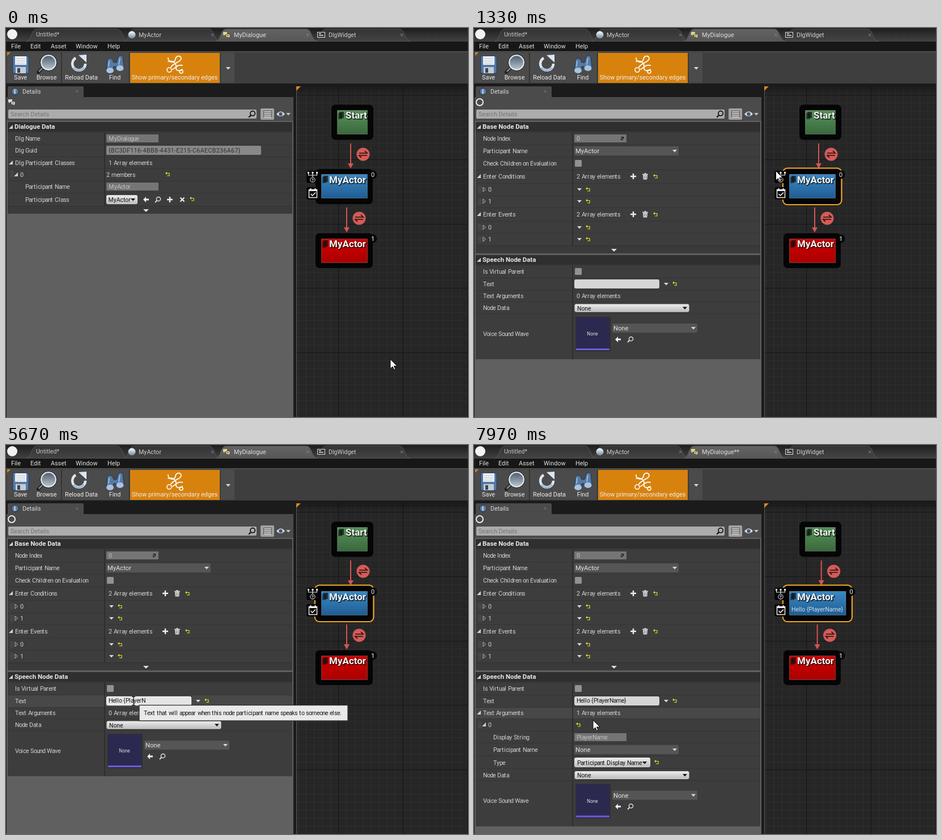
These frames come from a looping animation (815 px wide and 687 px high, 8000 ms). An HTML page:

```html
<!DOCTYPE html>
<html>
<head>
<meta charset="utf-8">
<style>
html,body{margin:0;width:100%;height:100%;overflow:hidden;background:#1c1c1c}
svg{display:block;width:815px;height:687px}
text{font-family:Roboto,sans-serif;white-space:pre}
</style>
</head>
<body>
<svg id="stage" viewBox="0 0 815 687" xmlns="http://www.w3.org/2000/svg"></svg>
<script>
const LOOP = 8000;
const MESSAGE = 'Hello {PlayerName}';
const KEYS = [2830, 2900, 3000, 3100, 3270, 3400, 4270, 4600, 4770, 4870, 5000, 5170, 5230, 5430, 5900, 6000, 6070, 6530];
const PATH = [[0, 678, 585], [430, 678, 585], [820, 621, 281], [1100, 621, 281], [1230, 558, 236], [1270, 558, 236],
  [1630, 225, 452], [7250, 225, 452], [7330, 165, 464], [7450, 100, 470], [7500, 100, 470], [7660, 11, 474],
  [7720, 11, 474], [7970, 210, 486]];
const SELECT = 870, FOCUS = 1770, BLUR = 7450, EXPAND = 7700;
const GROW = 88.5;

// Whole-pixel glyph advances, as in the small hinted UI type
const ADVANCE = {};
[['ilIj .,', 3], ['rtf{}-/', 4], ['PASVETBKLFXYR0123456789', 6], ['CDNHGOU', 7], ['w', 7], ['mW', 9], ['M', 10]]
  .forEach(([set, w]) => [...set].forEach(c => ADVANCE[c] = w));
const step = c => ADVANCE[c] || 5;
const width = s => [...s].reduce((w, c) => w + step(c), 0);
function spots(x, s) {
  return [...s].map(c => { const at = x; x += step(c); return at; }).join(' ');
}

const esc = s => s.replace(/&/g, '&amp;').replace(/</g, '&lt;');
const rect = (x, y, w, h, fill, more = '') => `<rect x="${x}" y="${y}" width="${w}" height="${h}" fill="${fill}" ${more}/>`;
const path = (d, more) => `<path d="${d}" ${more}/>`;
const line = (d, color, w = 1, more = '') => path(d, `fill="none" stroke="${color}" stroke-width="${w}" ${more}`);
const circle = (x, y, r, fill, more = '') => `<circle cx="${x}" cy="${y}" r="${r}" fill="${fill}" ${more}/>`;
const text = (x, y, s, size = 10.8, fill = '#d4d4d4', more = '') =>
  `<text x="${x}" y="${y}" font-size="${size}" fill="${fill}" ${more}>${esc(s)}</text>`;
const small = (x, y, s, fill = '#d2d2d2', more = '') =>
  `<text x="${spots(x, s)}" y="${y}" font-size="10.67" fill="${fill}" ${more}>${esc(s)}</text>`;
const group = (id, body, more = '') => `<g id="${id}" ${more}>${body}</g>`;
const at = (x, y, body) => `<g transform="translate(${x} ${y})">${body}</g>`;
const bold = 'font-weight="700"';

// Small icons
const undo = (x, y) => at(x, y, line('M-3-1.5H3V3H-1', '#dede28', 1.2) + path('M-4-1.5l3-2.5v5z', 'fill="#dede28"'));
const down = (x, y, f = '#d8d8d8') => path(`M${x - 4} ${y - 2}h8l-4 4.5z`, `fill="${f}"`);
const open = (x, y) => path(`M${x + 3} ${y - 4}v7h-7z`, 'fill="#d0d0d0"');
const shut = (x, y) => line(`M${x - 2} ${y - 4}l4.5 4-4.5 4z`, '#b8b8b8');
const plus = (x, y) => line(`M${x - 5} ${y}h10M${x} ${y - 5}v10`, '#eee', 2.4);
const cross = (x, y) => line(`M${x - 3.5} ${y - 3.5}l7 7m0-7l-7 7`, '#eee', 2.2);
const back = (x, y) => path(`M${x - 5} ${y}l5-5v3.5h5v3h-5v3.5z`, 'fill="#eee"');
const lens = (x, y, c = '#ddd', k = 1) => at(x, y, `<g transform="scale(${k})">` +
  circle(1, -1, 3.6, 'none', `stroke="${c}" stroke-width="1.5"`) + line('M-1.5 1.5L-5 5', c, 2) + '</g>');
const bin = (x, y) => at(x, y, path('M-4-2.5h8L3.3 5.5h-6.6z', 'fill="#ddd"') + line('M-5-3.5H5M-1.5-5h3', '#ddd', 1.3) +
  line('M-1.5-1v5M1.5-1v5', '#444', .8));
const grip = (x, y) => line(`M${x} ${y - 5}v11M${x + 3} ${y - 5}v11`, '#727272', 1.2, 'stroke-dasharray="1.3 1.7"');
const box = (x, y) => rect(x, y, 12, 12, '#929292', 'rx="1.5"');
const dim = (y, s) => rect(177, y - 7, 92, 14, '#757575', 'rx="1"') + small(181, y + 4, s, '#c0c0c0');
const combo = (x, y, w, s) => rect(x, y - 8, w, 16, '#555', 'rx="2"') +
  text(x + 2, y + 4, s, 11.2, '#e4e4e4') + down(x + w - 7, y);
const pale = (x, y, w, h) => rect(x, y, w, h, 'url(#pale)', 'rx="2" stroke="#dedede"');
const light = (x, y, w, s) => pale(x, y - 6.5, w, 13) + text(x + 4, y + 4, s, 10.4, '#111') + down(x + w - 7, y, '#111');
const bubbles = (x, y, c) => at(x, y, path('M-6-5h7v5h-4l-2 2v-2h-1z', `fill="${c}"`) +
  path('M-1-1h7v5h-1v2l-3-2h-3z', `fill="${c}" stroke="#444" stroke-width=".7"`) + line('M1 1.5h3', '#444'));

const bar = (y, s) => rect(3, y, 502, 17, '#2f2f2f') + open(9, y + 9) + text(15, y + 12.2, s, 11.4, '#e6e6e6', bold);
const rows = (ys, to) => ys.map(y => line(`M3 ${y + .5}H505`, '#353535')).join('') +
  line(`M174 ${ys[0]}V${to}`, '#292929', 1.4);
const foot = y => rect(3, y, 502, 14, '#3a3a3a') + line(`M3 ${y + .5}H505`, '#303030') + path(`M242 ${y + 6}h10l-5 5z`, 'fill="#ddd"');
const label = (y, s, x = 16) => small(x, y + 4, s);

function tabShape(x, w, fill) {
  return path(`M${x} 24C${x + 10} 22 ${x + 8} 2 ${x + 18} 2H${x + w - 16}C${x + w - 6} 2 ${x + w - 8} 22 ${x + w + 4} 24z`,
    `fill="${fill}" stroke="#666" stroke-width=".7"`);
}

function saveIcon() {
  return path('M12 49h25l3 3v28h-28z', 'fill="#5479a6" stroke="#263a55"') + rect(16, 50, 20, 15, '#eef1f5') +
    line('M18 54h16M18 58h16M18 62h16', '#b7c1cc') + rect(17, 69, 18, 11, '#c6cbd2') + rect(20, 71, 5, 8, '#34475f');
}

function browseIcon() {
  return line('M65 70l-8 8', '#222', 6, 'stroke-linecap="round"') + line('M66 69l-8 8', '#888', 2.5) +
    circle(75, 61, 13, 'url(#glass)', 'stroke="#e4e7ea" stroke-width="2.5"') + circle(75, 61, 14.6, 'none', 'stroke="#222"');
}

function reloadIcon() {
  return line('M123 53A11.500 11.500 0 1 0 140 63', '#dce6f2', 4.5) + path('M128 48l14-1v14z', 'fill="#dce6f2"') +
    line('M119 70A12 12 0 0 0 138 70', '#8eb0d6', 2.5);
}

function findIcon() {
  const eye = (x, y) => `<ellipse cx="${x}" cy="${y}" rx="6.5" ry="5" fill="#a9c3e2"/>`;
  return path('M177 75l2-19q4-5 9 0l2 5h5l3-10q4-5 8 0l2 18q-3 8-11 6l-3-7h-4l-2 9q-7 4-11-2z', 'fill="#547aa6" stroke="#22334a"') +
    eye(183.5, 75) + eye(201, 71) + line('M182 58l-1 10M201 53l-2 12', '#9bbade', 2);
}

function edgesIcon() {
  return line('M286 53c0 9 12 9 13 2s10-7 10-1-13 7-18 15M286 59c10-3 15 5 14 11s8 7 11 3M311 66c-9-2-11 4-17 7', '#fff', 1.8, 'stroke-linecap="round"') +
    circle(288, 74, 4, 'none', 'stroke="#fff" stroke-width="1.6"') + circle(309, 77, 3, 'none', 'stroke="#fff" stroke-width="1.6"');
}

function chrome() {
  const tool = (x, s) => text(x, 91, s, 10.75, '#eee', 'text-anchor="middle"');
  const closer = x => line(`M${x - 2} 10l4.5 4.5m0-4.5l-4.5 4.5`, '#888');
  return rect(0, 0, 815, 24, 'url(#top)') +
    tabShape(36, 176, 'url(#tab)') + tabShape(208, 166, 'url(#tab)') + tabShape(546, 164, 'url(#tab)') + tabShape(370, 176, 'url(#tabOn)') +
    circle(11, 11, 9, '#f2f2f2') +
    text(53, 15, 'Untitled*', 10.6, '#c4c4c4') + text(234, 16, 'MyActor', 10.7, '#cecece') + text(569, 16, 'DlgWidget', 10.6, '#cecece') +
    `<text id="docTab" x="402" y="16" font-size="10.8" fill="#dedede"></text>` +
    circle(222, 12, 6.5, 'url(#ball)') + bubbles(389, 12, '#e0d68c') +
    rect(549.5, 7.5, 13, 9, '#333', 'stroke="#ddd"') + line('M552 10h4M552 13h8', '#ddd', 1.3) +
    closer(364) + closer(532) + closer(698) +
    rect(0, 24, 815, 17, '#171717') +
    [[9, 'File'], [43, 'Edit'], [79, 'Asset'], [123, 'Window'], [179, 'Help']].map(([x, s]) => text(x, 36, s, 10.8, '#e2e2e2')).join('') +
    rect(0, 41, 815, 57, '#3e3e3e') + rect(0, 41, 815, 1.5, '#555') +
    rect(2, 43.5, 95, 53, '#4b4b4b', 'rx="2"') + rect(99, 43.5, 304, 53, '#4b4b4b', 'rx="2"') +
    line('M97.5 44v53M217.5 44v53', '#2b2b2b') + path('M2 43h6l-6 6z', 'fill="#d28a1c"') +
    rect(219, 44, 158, 53, '#d8820e') + line('M378 44v53', '#333') + down(392, 71, '#ddd') +
    tool(25.5, 'Save') + tool(71.5, 'Browse') + tool(133, 'Reload Data') + tool(192, 'Find') + tool(297.5, 'Show primary/secondary edges') +
    saveIcon() + browseIcon() + reloadIcon() + findIcon() + edgesIcon() +
    rect(0, 98, 815, 5, '#1b1b1b');
}

function panelFrame() {
  return rect(0, 102, 512, 585, '#1b1b1b') + rect(1, 122, 506, 565, '#606060') + path('M3 122V105q0-2 2-2h130q2 0 2 2v17z', 'fill="#4b4b4b"') +
    rect(1, 122, 506, 42, '#4b4b4b') +
    circle(16, 112, 6, '#5c7fa8', 'stroke="#20293a"') + text(14.3, 116, 'i', 10, '#fff', bold) +
    text(29, 116, 'Details', 10.6, '#d8d8d8') + line('M123.5 110l4 4m0-4l-4 4', '#7d7d7d') +
    rect(4, 144, 438, 16, '#acacac', 'rx="2"') + text(8, 156, 'Search Details', 10.7, '#757575') + lens(434, 152, '#111', 1.15) +
    rect(449, 142, 24, 20, '#a2a2a2', 'rx="2"') + rect(454, 146, 15, 12, '#555') + line('M455 148h13M455 151h13M455 154h13M455 157h13', '#eee', 1.3) +
    path('M477 152q8-9 15 0-8 8-15 0z', 'fill="#d8dde4"') + circle(484.5, 152, 3.2, '#48566b') + down(498, 152, '#c0c0c0');
}

function dialogueView() {
  return bubbles(10, 131, '#ddd') + bar(166, 'Dialogue Data') + rect(3, 183, 502, 131, '#3d3d3d') + rows([184, 205, 227, 248, 270, 291], 314) + foot(314) +
    label(195, 'Dlg Name') + dim(195, 'MyDialogue') +
    label(216, 'Dlg Guid') + rect(177, 208, 273, 16, '#888', 'rx="2"') +
    text(181, 220, '{BC3DF116-4BB8-4431-E215-C6AECB236A67}', 10.67, '#303030', 'letter-spacing=".36"') +
    open(9, 238) + label(237.5, 'Dlg Participant Classes') + small(181, 241.5, '1 Array elements') +
    grip(9, 258) + open(18, 259) + label(259, '0', 25) + small(177, 263, '2 members') + undo(285, 258) +
    label(280, 'Participant Name', 34) + dim(280, 'MyActor') +
    label(303, 'Participant Class', 34) + pale(177.5, 295.5, 54, 15) +
    text(180.5, 307, 'MyActor', 10.5, '#111') + down(224, 303, '#111') +
    back(247, 303) + lens(268, 303) + plus(289, 303) + cross(311, 303) + undo(328, 302);
}

function arrayRows(y, s) {
  return open(9, y) + label(y, s) + small(181, y + 4, '2 Array elements') + plus(281, y) + bin(302, y) + undo(320, y) +
    [[y + 23, '0'], [y + 44, '1']].map(([r, n]) => grip(9, r) + shut(18, r) + label(r, n, 25) + down(186, r) + undo(201, r)).join('');
}

function nodeView() {
  return circle(10, 131, 6, 'none', 'stroke="#eee" stroke-width="2"') +
    rect(3, 183, 502, 201, '#3d3d3d') + `<rect id="lowBack" x="3" y="418" width="502" fill="#3d3d3d"/>` +
    `<rect id="hover" x="3" width="502" fill="#484848"/>` +
    bar(166, 'Base Node Data') + rows([184, 206, 228, 250, 274, 296, 317, 341, 362], 384) + foot(384) + rect(3, 398, 502, 3, '#606060') +
    label(195, 'Node Index') + dim(195, '0') + path('M259 192h5v5zM259 194v4h4z', 'fill="#222"') +
    label(217, 'Participant Name') + combo(177, 217, 184, 'MyActor') +
    label(239, 'Check Children on Evaluation') + box(178, 233) +
    arrayRows(262, 'Enter Conditions') + arrayRows(329, 'Enter Events') +
    bar(401, 'Speech Node Data') + rows([419, 441, 463, 483], 505) +
    label(430, 'Is Virtual Parent') + box(178, 424) +
    label(452, 'Text') + `<rect id="field" x="177.5" y="444.5" width="149" height="15" rx="2"/>` +
    `<text id="typed" y="455" font-size="10.67" fill="#161616"></text>` + `<rect id="caret" y="445" width="1" height="12" fill="#111"/>` +
    down(339, 452) + undo(354, 451.5) +
    label(473, 'Text Arguments') + `<text id="count" y="477" font-size="10.67" fill="#d2d2d2"></text>` + group('argArrow', open(9, 473)) +
    group('args', rows([483, 505, 526, 549, 571], 590) +
      grip(9, 494) + open(18, 494) + label(494, '0', 25) + undo(184, 494) +
      label(516, 'Display String', 34) + dim(516, 'PlayerName') +
      label(538, 'Participant Name', 34) + combo(177, 538, 184, 'None') +
      label(560.5, 'Type', 34) + pale(177.5, 552.5, 133, 16) +
      small(182, 564.5, 'Participant Display Name', '#111') + down(301, 561, '#111') + undo(322, 560)) +
    group('low', rows([504], 585) + label(494, 'Node Data') + light(178, 494.5, 201, 'None') +
      label(539.5, 'Voice Sound Wave') + rect(179, 510, 62, 61, '#303030') + rect(180, 511, 59, 56, '#2c2950') + rect(180, 566, 59, 3, '#6a5ce2') +
      text(209, 543, 'None', 8.2, '#ddd', 'text-anchor="middle"') + combo(244, 530, 150, 'None') + back(254, 550) + lens(276, 550));
}

function gridLines() {
  let fine = '', strong = '';
  const add = (i, d) => i % 8 ? fine += d : strong += d;
  for (let i = -5; i <= 15; i++) add(i, `M${Math.round(586 + i * 14.25) + .5} 103V687`);
  for (let i = -1; i < 40; i++) add(i, `M512 ${Math.round(118 + i * 14.22) + .5}H815`);
  return line(fine, '#2e2e2e') + line(strong, '#151515');
}

const title = (x, y, s) => text(x + 1, y + 1, s, 17, '#000', bold + ' stroke="#000" stroke-width="1.5" opacity=".65"') + text(x, y, s, 17, '#f4f4f4', bold);
const badge = (x, y, s) => circle(x, y, 7.5, '#080808') + text(x, y + 4, s, 11, '#eee', 'text-anchor="middle"');
const mark = (x, y) => rect(x + 2, y, 8, 11, '#111', 'opacity=".7"') + rect(x, y + 2, 7, 11, '#111', 'opacity=".55"');
const rim = 'stroke="#fff" stroke-opacity=".22"';
const face = (x, y, w, fill) => rect(x + .5, y + .5, w - 1, 42, fill, rim);
function edge(id, x, y) {
  return group(id, line(`M${x} ${y}v37`, '#d55552', 2) + path(`M${x - 5} ${y + 35}h10l-5 9z`, 'fill="#d55552"') +
    circle(x + 22, y + 19, 11.5, '#d55b58') + line(`M${x + 15} ${y + 17}h14l-4-4M${x + 29} ${y + 21}h-14l4 4`, '#1d1111', 1.7));
}

function graph() {
  return rect(512, 103, 303, 584, '#262626') + gridLines() + rect(512, 103, 303, 14, 'url(#shade)') +
    line('M512.5 103V687', '#5a5a5a') + line('M814.5 103V687', '#151515') + path('M512 103h8l-8 8z', 'fill="#d28a1c"') +
    edge('edge0', 608, 204) + edge('edge1', 601, 317) +
    rect(574, 135.5, 74, 62, '#050505', 'rx="7"') + face(584, 145, 54, 'url(#green)') + mark(586, 148) + title(599, 160, 'Start') +
    `<rect id="ring" x="545" y="247.5" height="64.5" rx="8" fill="none" stroke="#f0a41c" stroke-width="2.2"/>` +
    `<rect id="shell" x="546" y="249" height="62" rx="7" fill="#050505"/><rect id="face" x="556.5" y="258.5" height="42" fill="url(#blue)" ${rim}/>` +
    mark(558, 261) + title(570, 273.5, 'MyActor') + group('said', text(560, 294, MESSAGE, 10.55, '#cfdeeb')) +
    group('zero', badge(647, 259, '0')) + badge(647, 372, '1') +
    rect(546, 362.5, 101, 61.5, '#050505', 'rx="7"') + face(556, 372, 82, 'url(#red)') + mark(558, 375) + title(570, 387, 'MyActor') +
    text(647, 376, '1', 11, '#eee', 'text-anchor="middle"') +
    rect(530, 252, 22, 22, '#050505', 'rx="4"') + line('M533.5 257v3h15v-3M541 255v8', '#eee', 1.2) +
    rect(532, 254, 3, 3, '#eee') + rect(539.5, 254, 3, 3, '#eee') + rect(547, 254, 3, 3, '#eee') +
    circle(541, 268, 4.2, '#050505', 'stroke="#eee"') + text(541, 271, '?', 7.5, '#eee', bold + ' text-anchor="middle"') +
    rect(530, 281, 22, 22, '#050505', 'rx="4"') + rect(534.5, 285.5, 14, 14, 'none', 'stroke="#eee" stroke-width="1.5"') +
    line('M534 287h15M537.5 283v3M545.5 283v3', '#eee', 2) + line('M537.5 293l3 3 5.5-5.5', '#eee', 1.7);
}

function tips() {
  return group('nodeTip', rect(633, 289, 200, 54, '#ececec', 'stroke="#555"') +
      text(641, 307, 'ParticipantName = MyActor', 10.75, '#181818') + text(641, 319.5, 'Type = Speech', 10.75, '#181818') +
      text(641, 332, 'Normal dialogue node - someone says something', 10.75, '#181818')) +
    group('textTip', rect(235, 459.5, 368, 27.5, '#e9e9e9', 'stroke="#333" stroke-width="1.3"') +
      small(243, 477, 'Text that will appear when this node participant name speaks to someone else.', '#141414'));
}

function pointers() {
  const both = d => line(d, '#000', 3.2) + line(d, '#fff', 1.3);
  const wide = 'M-7 0H7M-5-2.5L-8 0l3 2.5M5-2.5L8 0 5 2.5';
  return group('arrow', path('M0 0V16.5L4 13l2.6 5.5 2.3-1L6.4 12H12z', 'fill="#fff" stroke="#000" stroke-width=".9"')) +
    group('move', both(wide + 'M0-7V7M-2.5-5L0-8l2.5 3M-2.5 5L0 8l2.5-3')) +
    group('beam', line('M-3-7.5h2.5l.5 1 .5-1H3M0-7V7M-3 7.5h2.5l.5-1 .5 1H3', '#111', 1.2)) +
    group('split', both(wide));
}

const fade = (id, a, b, from = 1, to = 1) => `<linearGradient id="${id}" x2="0" y2="1">` +
  `<stop stop-color="${a}" stop-opacity="${from}"/><stop offset="1" stop-color="${b}" stop-opacity="${to}"/></linearGradient>`;
const stage = document.getElementById('stage');
stage.innerHTML = '<defs>' + fade('top', '#1e1e1e', '#424242') + fade('tab', '#333', '#444') + fade('tabOn', '#636363', '#575757') +
  fade('pale', '#ececec', '#bcbcbc') + fade('green', '#559259', '#3a693d') + fade('blue', '#3b88c3', '#205d93') + fade('red', '#cf0000', '#ac0000') +
  fade('glass', '#4a5b6b', '#bcc8d3') + fade('ball', '#fff', '#7083a4') + fade('shade', '#000', '#000', .35, 0) + '</defs>' +
  chrome() + graph() + panelFrame() + group('dialogue', dialogueView()) + group('node', nodeView()) + tips() + group('pointer', pointers());

const el = {};
stage.querySelectorAll('[id]').forEach(e => el[e.id] = e);
const show = (id, on) => el[id].style.display = on ? '' : 'none';
const set = (id, k, v) => el[id].setAttribute(k, v);
const shift = (id, x, y) => set(id, 'transform', `translate(${x} ${y})`);
function write(id, x, s) {
  set(id, 'x', s ? spots(x, s) : x);
  el[id].textContent = s;
}

function mouse(t) {
  let i = 0;
  while (i < PATH.length - 2 && t >= PATH[i + 1][0]) i++;
  const [t0, x0, y0] = PATH[i], [t1, x1, y1] = PATH[i + 1];
  const u = Math.min(1, (t - t0) / (t1 - t0)), k = u * u * (3 - 2 * u);
  return [x0 + (x1 - x0) * k, y0 + (y1 - y0) * k];
}

const EDGES = [184, 206, 228, 250, 274, 296, 317, 341, 362, 384, 419, 441, 463, 483, 504, 585];
function hoverRow(x, y) {
  const i = EDGES.findIndex((e, n) => y >= e && y < EDGES[n + 1]);
  const on = x < 505 && i >= 0 && EDGES[i] !== 384;
  show('hover', on);
  if (on) {
    set('hover', 'y', EDGES[i]);
    set('hover', 'height', EDGES[i + 1] - EDGES[i]);
  }
}

function update(t) {
  const [x, y] = mouse(t);
  const picked = t >= SELECT, focus = t >= FOCUS && t < BLUR, done = t >= BLUR, wide = t >= EXPAND;

  show('dialogue', !picked);
  show('node', picked);
  show('ring', picked);
  hoverRow(x, Math.min(y, 480));

  // text field and blinking caret
  const n = KEYS.filter(k => k <= t).length;
  const typed = MESSAGE.slice(0, n);
  write('typed', 181, typed);
  set('field', 'fill', focus ? '#e4e4e4' : '#d6d6d6');
  set('field', 'stroke', focus ? '#ffffff' : '#d6d6d6');
  const d = t - (n ? KEYS[n - 1] : 2000);
  show('caret', focus && t > 1830 && (d < 229 || Math.floor((d - 229) / 500) % 2 === 1));
  set('caret', 'x', 181 + width(typed));

  // committed text
  write('count', 181, (done ? 1 : 0) + ' Array elements');
  el.docTab.textContent = done ? 'MyDialogue**' : 'MyDialogue';
  show('argArrow', done);
  show('args', wide);
  shift('low', 0, wide ? GROW : 0);
  set('lowBack', 'height', 167 + (wide ? GROW : 0));
  const more = done ? 18.5 : 0;
  set('ring', 'width', 103.5 + more);
  set('shell', 'width', 101 + more);
  set('face', 'width', 81 + more);
  shift('zero', more, 0);
  shift('edge0', more / 4, 0);
  shift('edge1', more / 4, 0);
  show('said', done);

  // tooltips
  show('nodeTip', t >= 930 && t < 1110);
  set('nodeTip', 'opacity', Math.min(1, (t - 900) / 120));
  const p = Math.max(0, Math.min(1, (t - 1740) / 200)), left = (1 - p) * (1 - p);
  show('textTip', t >= 1770 && t < 7270);
  set('textTip', 'opacity', 1 - left);
  shift('textTip', 9 * left, 0);

  const kind = x > 546 && x < 647 && y > 249 && y < 311 ? 'move'
    : x > 177 && x < 326 && y > 443 && y < 461 ? 'beam'
    : Math.abs(x - 174) < 12 && y > 184 ? 'split' : 'arrow';
  ['arrow', 'move', 'beam', 'split'].forEach(id => show(id, id === kind));
  shift('pointer', x, y);
}

function tick() {
  update(performance.now() % LOOP);
  requestAnimationFrame(tick);
}
tick();
</script>
</body>
</html>
```
